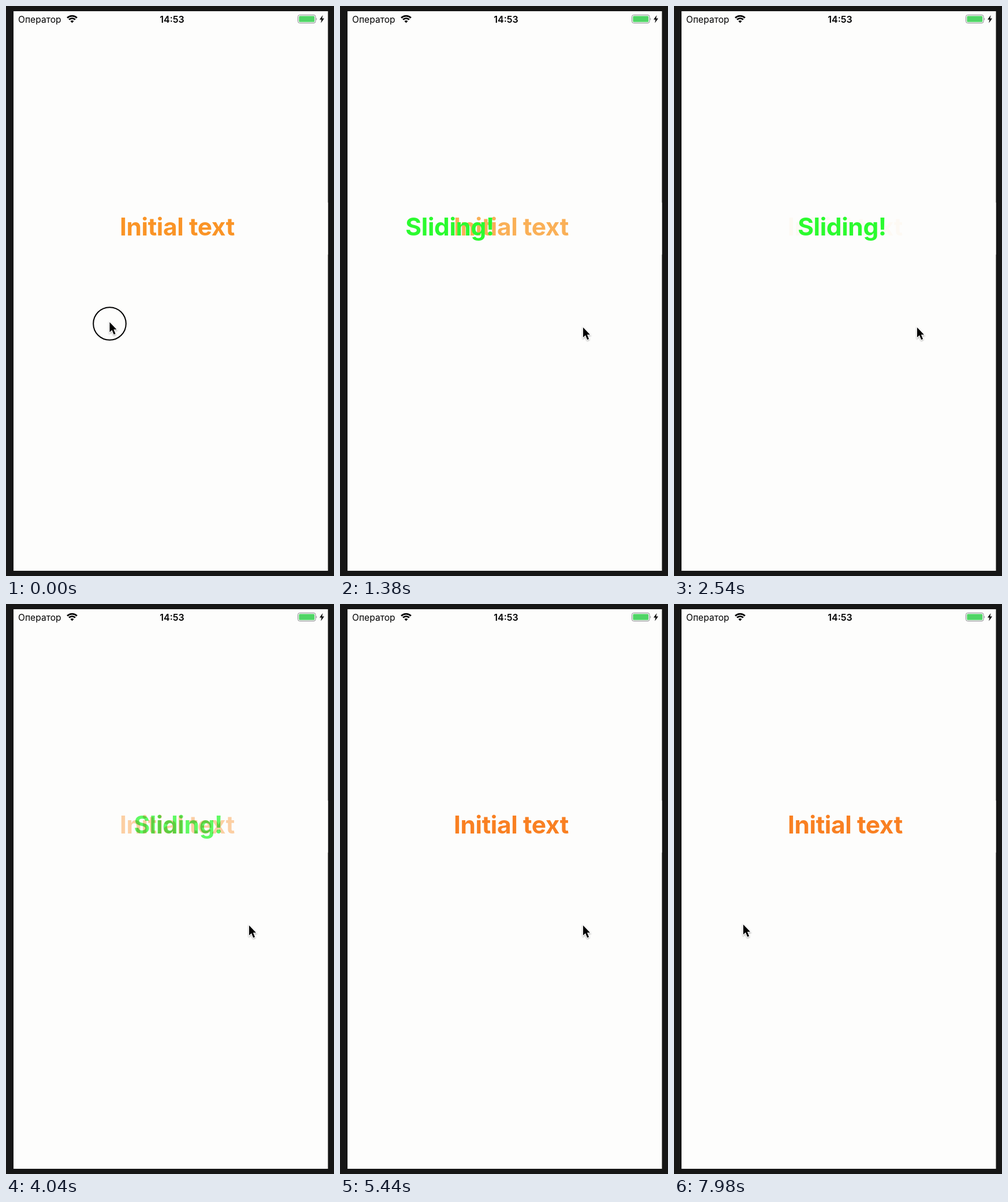
Animation, 568 px wide and 986 px high, one loop 8000 ms. Source, as an HTML page:

```html
<!DOCTYPE html>
<html lang="en">
<head>
<meta charset="utf-8">
<title>Sliding label</title>
<style>
  html, body { margin: 0; width: 100%; height: 100%; overflow: hidden; background: #161616; }
  svg { display: block; width: 100%; height: 100%; }
  text { font-family: Inter, "Liberation Sans", sans-serif; }
  .label { font-size: 42.5px; font-weight: 700; letter-spacing: -0.4px; }
</style>
</head>
<body>
<svg viewBox="0 0 568 986">
  <rect width="568" height="986" fill="#161616"/>
  <rect x="13" y="9" width="544.5" height="968" fill="#fdfdfc"/>

  <!-- status bar -->
  <text x="21" y="28.8" font-size="15.6">Оператор</text>
  <g fill="none" stroke="#000" stroke-width="2.8">
    <path d="M106.1 20.6a11.9 11.9 0 0 1 16.8 0"/>
    <path d="M109.1 23.6a7.6 7.6 0 0 1 10.8 0"/>
    <path d="M114.5 29.3l-3-3a4.2 4.2 0 0 1 6 0z" fill="#000" stroke="none"/>
  </g>
  <text x="287.5" y="28.8" font-size="16" font-weight="600" text-anchor="middle">14:53</text>
  <rect x="505.5" y="15.5" width="30.5" height="14" rx="3" fill="none" stroke="#85858a"/>
  <rect x="507.3" y="17.3" width="26.9" height="10.4" rx="1.5" fill="#4fd565"/>
  <path d="M537.3 20.2q2 2.3 0 4.6z" fill="#85858a"/>
  <path d="M548.6 15.8L543 23.6h3.5l-1.3 5.8 5.8-8h-3.7z"/>

  <!-- stage -->
  <g style="isolation:isolate">
    <rect x="13" y="340" width="544.5" height="90" fill="#fdfdfc"/>
    <text id="initial" class="label" x="197" y="397">Initial text</text>
    <g clip-path="url(#screen)" id="sliding">
      <text id="slidingText" class="label" y="397" fill="#2bfb2f">Sliding!</text>
    </g>
  </g>

  <g id="pointer">
    <circle id="touch" cy="2.5" r="28.3" fill="none" stroke="#000" stroke-width="2"/>
    <path d="M0 0V17.3L4 13.5 7.2 21.2 10.1 20 6.9 12.4H12z" fill="#000" stroke="#fff"
          stroke-width="2" paint-order="stroke" filter="url(#shadow)"/>
  </g>

  <defs>
    <clipPath id="screen"><rect x="13" y="9" width="544.5" height="968"/></clipPath>
    <filter id="shadow" x="-60%" y="-40%" width="220%" height="200%">
      <feDropShadow dx="0" dy="1.2" stdDeviation="1.2" flood-color="#000" flood-opacity=".4"/>
    </filter>
  </defs>
</svg>

<script>
const LOOP = 8000;
const [initial, sliding, slidingText, pointer, touch] =
  ['initial', 'sliding', 'slidingText', 'pointer', 'touch'].map(id => document.getElementById(id));

const clamp = v => Math.min(1, Math.max(0, v));

// Monotone cubic through [time, value] points
function curve(points) {
  const n = points.length - 1;
  const slope = i => (points[i + 1][1] - points[i][1]) / (points[i + 1][0] - points[i][0]);
  const tangent = points.map((_, i) => {
    if (i === 0) return slope(0);
    if (i === n) return 0;
    const a = slope(i - 1), b = slope(i);
    return a * b > 0 ? 2 * a * b / (a + b) : 0;
  });
  return t => {
    if (t <= points[0][0]) return points[0][1];
    if (t >= points[n][0]) return points[n][1];
    let i = 0;
    while (t >= points[i + 1][0]) i++;
    const [t0, v0] = points[i], [t1, v1] = points[i + 1];
    const h = t1 - t0, u = (t - t0) / h, w = 1 - u;
    return w * w * (1 + 2 * u) * v0 + u * u * (3 - 2 * u) * v1
      + h * u * w * (w * tangent[i] - u * tangent[i + 1]);
  };
}

// Linear blend through [time, [r, g, b]] points
function colorAt(stops, t) {
  let i = 0;
  while (i < stops.length - 2 && t >= stops[i + 1][0]) i++;
  const [t0, a] = stops[i], [t1, b] = stops[i + 1];
  const u = clamp((t - t0) / (t1 - t0));
  return `rgb(${a.map((v, k) => Math.round(v + (b[k] - v) * u))})`;
}

const slideIn = curve([[0, -152], [400, -40], [820, 37], [1380, 115], [1560, 142], [2540, 216], [3340, 216.7]]);
const slideX = t => slideIn(t) + 1.33e-5 * Math.max(0, t - 3340) ** 2;
const slideAlpha = curve([[3340, 1], [4040, 0.75], [4950, 0]]);

const drag = curve([[0, 179], [280, 320], [600, 421]]);
const goBack = curve([[6700, 421], [6880, 333], [7100, 255], [7440, 178], [7980, 120]]);
const pointerX = t => t < 6700 ? drag(t) : goBack(t);
const pointerY = curve([[0, 547], [600, 556], [6880, 556], [7980, 554.5]]);

const paper = [253, 253, 252];
const orange = [249, 128, 34];
const initialColor = [
  [0, [250, 148, 38]], [900, [250, 148, 38]], [1380, [250, 176, 87]],
  [2540, [253, 249, 243]], [2620, paper], [3340, paper],
  [4040, [252, 207, 163]], [5000, orange], [LOOP, orange]
];

function render(t) {
  initial.setAttribute('fill', colorAt(initialColor, t));
  slidingText.setAttribute('x', slideX(t) - 1.8);
  sliding.setAttribute('opacity', t < 4950 ? slideAlpha(t) : 0);
  sliding.style.mixBlendMode = t < 3340 ? 'normal' : 'multiply';
  pointer.setAttribute('transform', `translate(${pointerX(t)} ${pointerY(t)})`);
  touch.setAttribute('opacity', t < 640 ? 1 : 0);
}

const start = performance.now();
function tick() {
  render((performance.now() - start) % LOOP);
  requestAnimationFrame(tick);
}
render(0);
requestAnimationFrame(tick);
</script>
</body>
</html>
```
